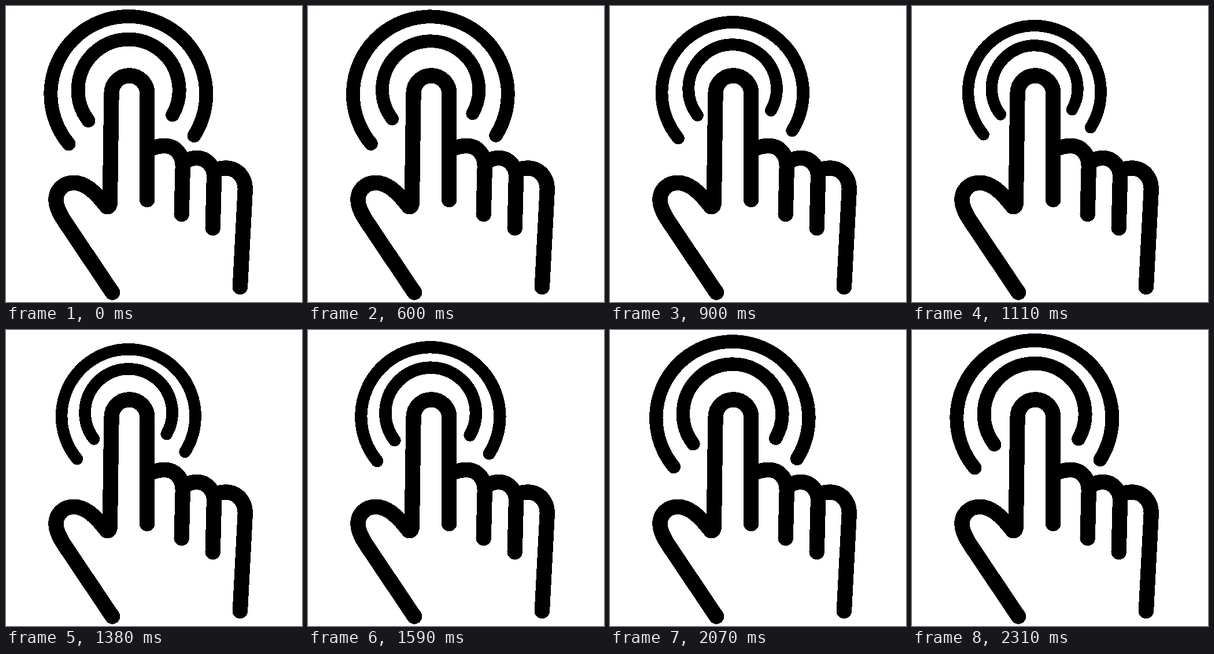
Recreate the animation shown at these times as an HTML page. Size 512x512 px, loop 3030 ms.

```html
<!DOCTYPE html>
<html lang="en">
<head>
<meta charset="utf-8">
<title>Tap</title>
<style>
  html, body { margin: 0; width: 100%; height: 100%; overflow: hidden; background: #fff; }
  svg { display: block; width: 100%; height: 100%; }
  path { fill: none; stroke: #000; stroke-linecap: round; stroke-linejoin: round; shape-rendering: crispEdges; }
</style>
</head>
<body>
<svg viewBox="0 0 512 512">
  <g stroke-width="23.9">
    <path id="outer" d="M108.5 238.5A134.5 134.5 0 1 1 325.6 224.2"/>
    <path id="inner" d="M142.5 198.2A87.5 87.5 0 1 1 288.2 188.4"/>
  </g>
  <g stroke-width="26.4">
    <!-- palm, thumb and index finger -->
    <path d="M184 495.5L103 375C91 357 86.5 346 86.5 335C86.5 318 100 305.8 117 305.8C137 305.8 154 321 174.5 347.3
             Q179.6 347.5 179.8 340L182.5 151.3A30.9 30.9 0 0 1 213.4 120.3A30.9 30.9 0 0 1 244.2 151.3V335"/>
    <!-- folded fingers -->
    <path d="M245 249.5C255 244 265 242 275 242C293 242 306 257 305.8 278L303.7 360"/>
    <path d="M307 272C313 266 322 263 330 263C347 263 360 277 360 295L357.7 384"/>
    <path d="M362 285C368 281 374 280.5 380 280.5C400 280.5 413.8 296 413.8 317L404.9 486"/>
  </g>
</svg>
<script>
const LOOP = 3030, STEP = 30, SHRINK = 0.15;
const PIVOT = { x: 212, y: 128 };

const arcs = [
  { el: document.getElementById('inner'), press: [330, 1080], release: [1170, 2340] },
  { el: document.getElementById('outer'), press: [540, 1170], release: [1200, 2310] }
];

function ease(time, [start, end]) {
  const p = Math.min(1, Math.max(0, (time - start) / (end - start)));
  return p * p * (3 - 2 * p);
}

function render(time) {
  for (const { el, press, release } of arcs) {
    const scale = 1 - SHRINK * (ease(time, press) - ease(time, release));
    el.setAttribute('transform',
      `translate(${PIVOT.x} ${PIVOT.y}) scale(${scale}) translate(${-PIVOT.x} ${-PIVOT.y})`);
  }
}

const origin = performance.now();
function tick() {
  const time = (performance.now() - origin) % LOOP;
  render(Math.floor(time / STEP) * STEP);
  requestAnimationFrame(tick);
}
tick();
</script>
</body>
</html>
```
